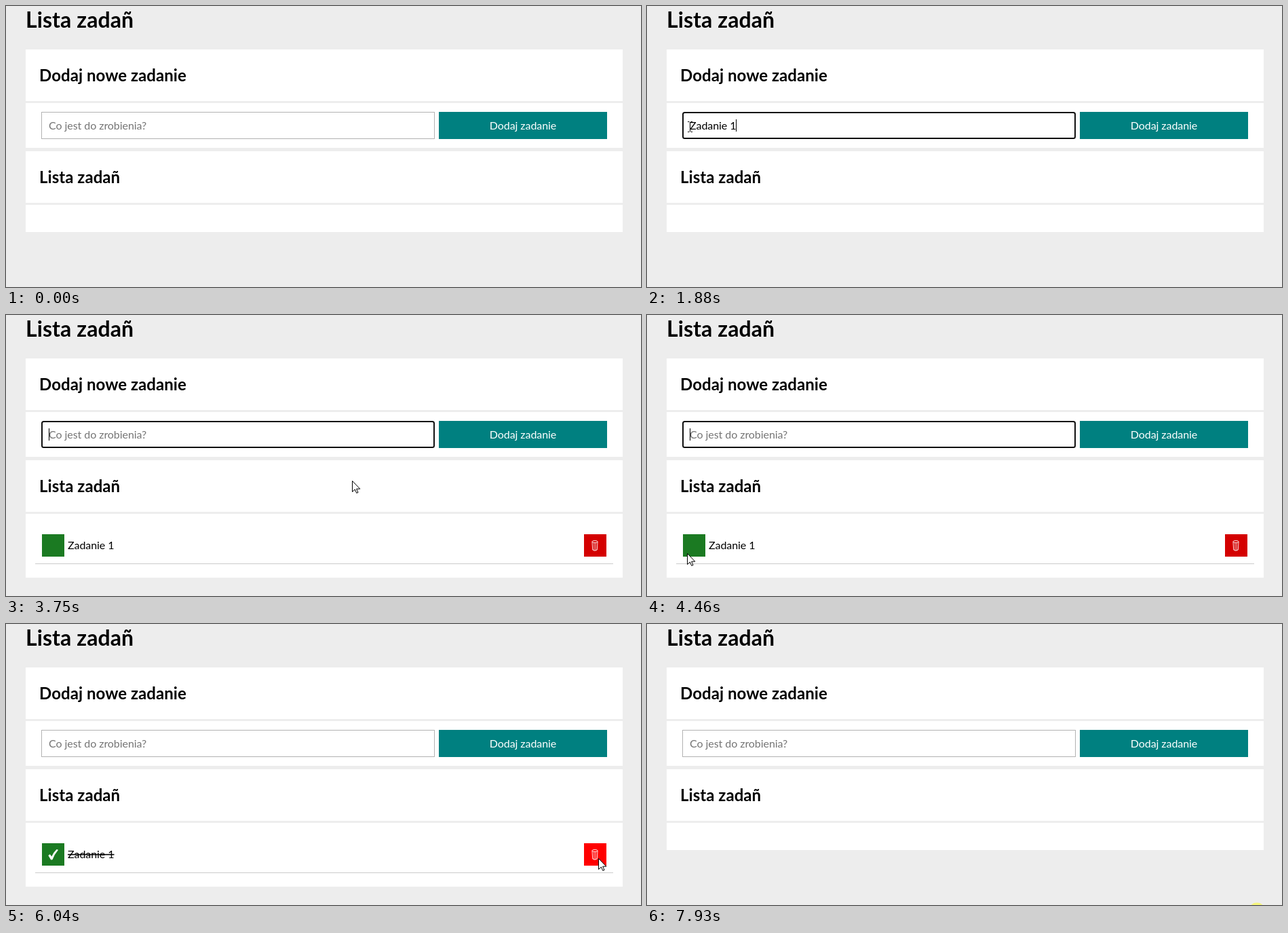
An HTML page for the animation above (8.06 s loop, 936 by 414 pixels).

```html
<!DOCTYPE html>
<html lang="pl">
<head>
<meta charset="utf-8">
<title>Lista zadañ</title>
<style>
  html, body { margin: 0; width: 100%; height: 100%; overflow: hidden; background: #ededed; }
  svg { display: block; width: 936px; height: 414px; }
  text { font: 16px Lato, sans-serif; letter-spacing: -.06px; white-space: pre; }
  .h1 { font-size: 32px; font-weight: 700; letter-spacing: .1px; }
  .h2 { font-size: 24px; font-weight: 700; letter-spacing: .05px; }
  .done { text-decoration: line-through; }
</style>
</head>
<body>
<svg viewBox="0 0 936 414">
  <rect width="936" height="414" fill="#ededed"/>
  <g fill="#fff">
    <rect x="29" y="64" width="880" height="76"/>
    <rect x="29" y="143" width="880" height="66"/>
    <rect x="29" y="214" width="880" height="76"/>
    <rect id="list" x="29" y="293" width="880" height="40"/>
  </g>
  <text class="h1" x="29" y="32">Lista zadañ</text>
  <text class="h2" x="49" y="111">Dodaj nowe zadanie</text>
  <text class="h2" x="49" y="261">Lista zadañ</text>

  <rect id="border" x="52.5" y="156.5" width="579" height="39" fill="#fff" stroke="#b2b2b2"/>
  <rect id="focus" x="53" y="157" width="578" height="38" rx="2.5" fill="#fff" stroke="#101010" stroke-width="2"/>
  <text id="value" x="63" y="182"></text>
  <rect id="caret" y="167" width="1" height="18"/>

  <rect id="add" x="638" y="156" width="248" height="40"/>
  <text x="762" y="182" fill="#fff" text-anchor="middle">Dodaj zadanie</text>

  <g id="item">
    <rect id="toggle" x="53" y="323" width="33" height="33"/>
    <path id="tick" d="M62.3 341 L64.8 339.2 L67.3 342.4 Q70.3 336 74.6 332 L77 332.8 Q71.4 339.4 68.5 347.2 L66.2 347.5 Z" fill="#fff"/>
    <text id="label" x="91" y="345">Zadanie 1</text>
    <rect id="trash" x="852" y="323" width="33" height="33"/>
    <g fill="none" stroke="#fff" stroke-width=".9">
      <ellipse cx="868" cy="334" rx="4.3" ry="1.5"/>
      <path d="M864 334.5 L864.7 346 Q868 348.4 871.3 346 L872 334.5"/>
      <path d="M866.5 336 V347 M868 336 V347.5 M869.5 336 V347" stroke-width=".5"/>
    </g>
    <rect x="43" y="366" width="852" height="1" fill="#ccc"/>
  </g>

  <g id="pointer">
    <path id="arrow" d="M.5 .5 V16.5 L4.3 13 L6.8 18.4 L9 17.4 L6.6 12.2 H11.8 Z" fill="#fff" stroke="#000" stroke-linejoin="round"/>
    <path id="beam" d="M-3 -7.5 H-.5 M1.5 -7.5 H4 M.5 -7 V7 M-3 7.5 H-.5 M1.5 7.5 H4" fill="none" stroke="#000"/>
    <circle id="press" r="12.4" fill="#ff0" fill-opacity=".48"/>
  </g>
</svg>
<script>
const LOOP = 8060, STEP = 70, BLINK = 530;
const $ = id => document.getElementById(id);
const show = (id, on) => $(id).setAttribute('visibility', on ? 'visible' : 'hidden');
const fill = (id, color) => $(id).setAttribute('fill', color);
const within = (t, a, b) => t >= a && t < b;

const field = { x: 52, y: 156, w: 580, h: 40 };
const add = { x: 638, y: 156, w: 248, h: 40 };
const toggle = { x: 53, y: 323, w: 33, h: 33 };
const trash = { x: 852, y: 323, w: 33, h: 33 };
const over = ([x, y], box) => within(x, box.x, box.x + box.w) && within(y, box.y, box.y + box.h);

// Each trip bends once, towards "via"
const trips = [
  { start: 460, end: 950, from: [294, 313], via: [100, 180], to: [63, 178] },
  { start: 2410, end: 2620, from: [120, 177], via: [420, 177], to: [702, 177] },
  { start: 3750, end: 4530, from: [510, 244], via: [20, 440], to: [61, 345] },
  { start: 5270, end: 6040, from: [163, 360], via: [520, 382], to: [873, 345] },
  { start: 7230, end: 7580, from: [873, 350], via: [873, 380], to: [873, 416] },
  { start: 7930, end: 7930, from: [899, 423], via: [899, 423], to: [899, 423] }
];

function pointerAt(t) {
  const trip = trips.filter(p => t >= p.start).pop();
  if (!trip) return [-50, -50];
  const { start, end, from, via, to } = trip;
  const gone = Math.floor((t - start) / STEP) * STEP;
  const u = t >= end ? 1 : 1 - (1 - gone / (end - start)) ** 1.5;
  const v = 1 - u;
  return from.map((p, i) => Math.round(v * v * p + 2 * u * v * via[i] + u * u * to[i]));
}

function draw(t) {
  const pos = pointerAt(t), late = pointerAt(t - STEP);
  const typed = within(t, 1880, 3290);
  const focused = within(t, 1090, 3090) || within(t, 3290, 4670);
  const pressed = within(t, 1090, 1220) || within(t, 3020, 3290) ||
    within(t, 4600, 4740) || within(t, 6570, 6700) || t >= 7930;
  const hasItem = within(t, 3290, 6700);
  const done = within(t, 4740, 6700);

  show('border', !focused);
  show('focus', focused);
  $('value').textContent = typed ? 'Zadanie 1' : 'Co jest do zrobienia?';
  fill('value', typed ? '#000' : '#757575');

  const since = hasItem ? 3290 : 1090;
  const lit = typed ? t < 1880 + BLINK : Math.floor((t - since) / BLINK) % 2 === 0;
  show('caret', focused && lit);
  $('caret').setAttribute('x', typed ? 131 : 63);

  fill('add', over(pos, add) ? '#006666' : '#008080');
  $('list').setAttribute('height', hasItem ? 94 : 40);
  $('item').setAttribute('display', hasItem ? 'inline' : 'none');
  fill('toggle', over(late, toggle) ? '#24a32a' : '#1b7a22');
  fill('trash', over(late, trash) ? '#ff0000' : '#d40000');
  show('tick', done);
  $('label').setAttribute('class', done ? 'done' : '');

  const inField = over(pos, field);
  $('pointer').setAttribute('transform', `translate(${pos})`);
  show('arrow', !inField);
  show('beam', inField);
  show('press', pressed);
}

const begin = performance.now();
function tick() {
  draw((performance.now() - begin) % LOOP);
  requestAnimationFrame(tick);
}
tick();
</script>
</body>
</html>
```
